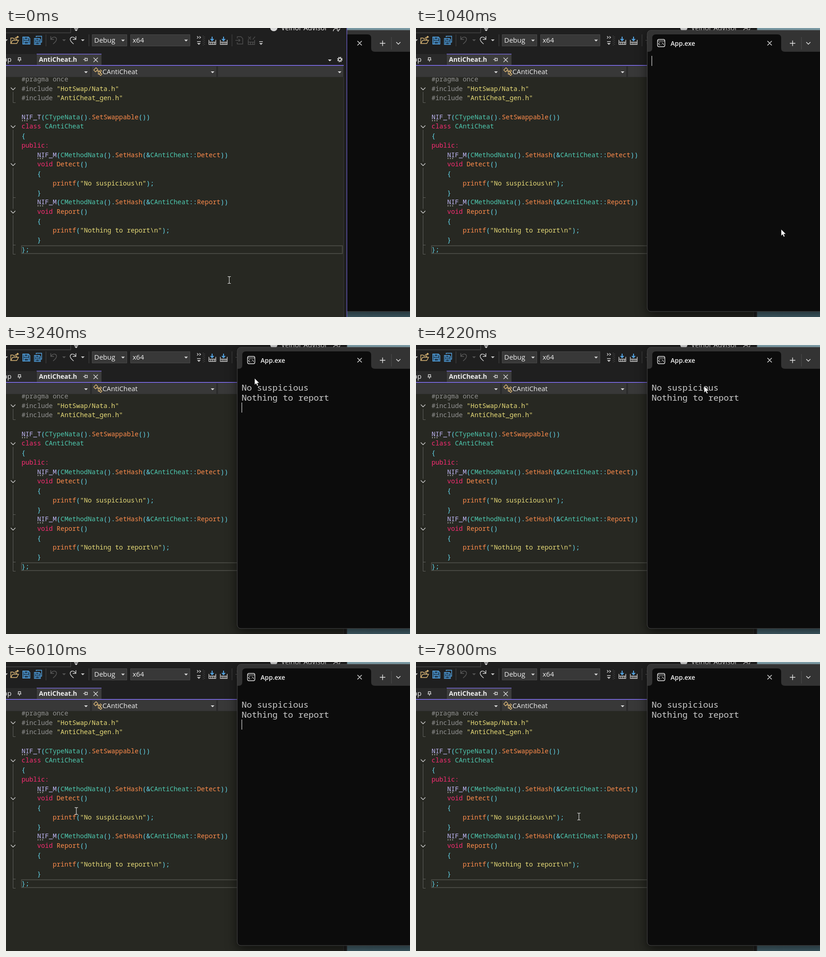
Animation of 884 by 633 pixels, one loop 8000 ms. Source, as an HTML page:

```html
<!DOCTYPE html>
<html lang="en">
<head>
<meta charset="utf-8">
<title>Hot reload demo</title>
<style>
  html, body { margin: 0; height: 100%; overflow: hidden; background: #1f1f1f; }
  svg { display: block; width: 100vw; height: 100vh; }
  text { font: 14.8px "Open Sans", sans-serif; fill: #f0f0f0; white-space: pre; }
  #code text { font: 500 14.23px "Noto Sans Mono", monospace; }
  #term { filter: drop-shadow(0 8px 12px #0009); }
  #term .out { font: 500 18.8px "Noto Sans Mono", monospace; fill: #ccc; }
  .line { fill: none; stroke-width: 1.4; }
</style>
</head>
<body>
<svg id="stage" viewBox="0 0 884 633">
  <defs>
    <linearGradient id="sky" x2="1" y2="0">
      <stop offset="0" stop-color="#7397a4"/><stop offset="1" stop-color="#8badb8"/>
    </linearGradient>
    <linearGradient id="sea" x2="1" y2="0">
      <stop offset="0" stop-color="#567683"/><stop offset="1" stop-color="#486873"/>
    </linearGradient>
    <path id="tri" d="M-4-2H4L0 2Z"/>
    <path id="fold" class="line" d="M-5-2.5L0 2.5L5-2.5" stroke="#d0d0d0"/>
    <g id="disk" class="line" stroke="#55a8e8">
      <path d="M.7.7H13L16.3 4V16.3H.7Z" fill="#24415a"/><path d="M4 1V6H12V1M4 16V10H13V16"/>
    </g>
    <g id="build" class="line">
      <path d="M8 0V8M4.5 5L8 8.5L11.5 5" stroke="#55a8e8" stroke-width="2"/>
      <path d="M1 7V17H16V7M1 12H16M5 12V17M9 12V17M13 12V17" stroke="#c8c8c8"/>
    </g>
    <g id="pin" class="line" stroke="#d8d8d8"><path d="M0 0H4M4-4V4M4-2.5H9V2.5H4"/></g>
  </defs>

  <rect width="884" height="20" fill="url(#sky)"/>
  <rect y="600" width="884" height="33" fill="url(#sea)"/>

  <g id="ide">
    <rect width="746" height="633" fill="#1f1f1f"/>
    <path class="line" d="M0 10.5H141.5V0" stroke="#444"/>
    <path d="M149 0h9v1.5h-9z" fill="#ddd"/><use href="#tri" x="153.500" y="5" fill="#ddd"/>
    <circle cx="586" cy="-1" r="8" fill="#d8d8d8"/>
    <text x="602" y="5" style="font-size:15px">Velnor Advisor</text>
    <path class="line" d="M716 7Q717 1 722 1Q725 1 727 3M724 4L727 7L731 1" stroke="#ddd"/>

    <!-- toolbar -->
    <g fill="#c8c8c8">
      <use href="#tri" x="0" y="27"/><use href="#tri" x="168" y="27"/>
      <use href="#tri" x="127" y="27" fill="#555"/>
      <use href="#tri" x="422" y="35"/><use href="#tri" x="558" y="35"/>
      <path d="M418 29h8v1.500h-8zM554 29h8v1.500h-8z"/>
    </g>
    <path class="line" d="M10.500 34V22H15.500L17.500 24H23.500V27M10.500 34L14.500 27H27.500L23.500 34ZM19.500 21H25.500V18M23 20.500L25.500 18L28 20.500" stroke="#e0bb78"/>
    <use href="#disk" x="36" y="19"/>
    <use href="#disk" x="61" y="21" transform="translate(9 4) scale(.86)"/>
    <path class="line" d="M66 20V18H78V31H76" stroke="#55a8e8"/>
    <path class="line" d="M87.500 14V40M181.500 14V40M494.500 14V40" stroke="#3d3d3d"/>
    <path class="line" d="M98 18V25H105M98 25Q102 19 107 20Q112 22 110 27Q109 30 103 35" stroke="#5a5a5a"/>
    <path class="line" d="M153 18V25H146M153 25Q149 19 144 20Q139 22 141 27Q142 30 148 35" stroke="#d0d0d0"/>
    <path d="M188.500 14.500h76v25h-76zM272.500 14.500h130v25h-130z" fill="#383838" stroke="#484848"/>
    <text x="193" y="32" style="font-size:15px">Debug</text>
    <text x="277" y="32" style="font-size:15px">x64</text>
    <use href="#tri" x="256" y="27.500" fill="#ddd"/><use href="#tri" x="394" y="27.500" fill="#ddd"/>
    <path class="line" d="M418 18L421 20.500L418 23M423 18L426 20.500L423 23" stroke="#ccc"/>
    <path class="line" d="M431.500 17V38M434.500 19V38" stroke="#555" stroke-dasharray="1.500 2.500"/>
    <use href="#build" x="443" y="19"/><use href="#build" x="468" y="19"/>
    <g class="line" stroke="#505050">
      <path d="M506 23V19H514L518 23V35H506V31M502 27H512M509 24L512 27L509 30"/>
      <path d="M530 26V36H544V26M530 31H544M535 31V36M540 31V36M530 19L536 25M536 19L530 25M540 25L545 19"/>
    </g>

    <!-- tabs -->
    <rect y="57" width="66" height="24" fill="#2a2a2a"/>
    <rect x="67" y="57" width="142" height="25" fill="#3d3d3d"/>
    <path d="M67 56.500h142v1.500H67zM0 81h739v2H0z" fill="#7567d2"/>
    <text x="12" y="74" text-anchor="end" fill="#ccc">pp</text>
    <use href="#pin" transform="translate(29.500 74) rotate(-90)"/>
    <text x="72" y="74" style="font-weight:700;font-size:14px">AntiCheat.h</text>
    <use href="#pin" x="169" y="69"/>
    <path class="line" d="M191.500 65L201 74.500M201 65L191.500 74.500" stroke="#ddd"/>
    <use href="#tri" x="708.500" y="71" fill="#ddd"/>
    <circle class="line" cx="730.500" cy="69" r="4.600" stroke="#ddd" style="stroke-width:2.500;stroke-dasharray:2.100 1.510"/>
    <circle class="line" cx="730.500" cy="69" r="3" stroke="#ddd"/>

    <!-- editor -->
    <rect y="107" width="739" height="526" fill="#272822"/>
    <rect x="34" y="477" width="702" height="17" fill="none" stroke="#464741" stroke-width="2"/>
    <path class="line" d="M15.500 140V163.500H21M15.500 223V293M15.500 306V396M15.500 371.500H21M15.500 410V495.500H21M15.500 475.500H21" stroke="#62635e" style="stroke-width:1"/>
    <g id="folds"></g>
    <g id="code"></g>
    <rect id="editCaret" x="50" y="477" width="1" height="17" fill="#eee"/>

    <!-- navigation bar -->
    <rect y="83" width="739" height="25" fill="#2b2b2b"/>
    <path d="M0 84h184v23H0zM188 84h272v23H188zM464 84h274v23H464z" fill="#383838"/>
    <text x="-3" y="101">:</text>
    <g fill="#ddd"><use href="#tri" x="175" y="97"/><use href="#tri" x="452" y="97"/><use href="#tri" x="730" y="97"/></g>
    <path class="line" d="M192 92L197 87L201 91L196 96ZM199 94H206M202 94V101H205M206 91L209 94L206 97L203 94M207 98L210 101L207 104L204 101Z" stroke="#e0bb78"/>
    <text x="211" y="101">CAntiCheat</text>
    <path d="M738 108h1v525h-1z" fill="#3a3a3a"/>
    <path id="ideEdge" d="M745 0h1.500v633h-1.500z"/>
  </g>

  <g id="term">
    <rect x="506" y="5" width="400" height="616" rx="8" fill="#0c0c0c"/>
    <path d="M506 52V13Q506 5 514 5H884V52Z" fill="#333"/>
    <path d="M509 52Q517 52 517 44V22Q517 14 525 14H791Q799 14 799 22V44Q799 52 807 52Z" fill="#0c0c0c"/>
    <rect x="506" y="5" width="400" height="616" rx="8" fill="none" stroke="#484848"/>
    <g class="line" stroke="#e8e8e8">
      <rect x="528.500" y="25" width="16" height="16" rx="3"/>
      <path d="M529 28.500H544M534.500 32Q531 32 531 34.500T534.500 37M537 32V33M537 36V37M539 32L542 37" style="stroke-width:1.200"/>
      <path d="M769 28.500L778.500 38M778.500 28.500L769 38M818 33.500H830M824 27.500V39.500M854 31L858.500 35.500L863 31"/>
      <path d="M843.500 20V47" stroke="#484848"/>
    </g>
    <text x="557" y="39" style="font-weight:600;font-size:14px">App.exe</text>
    <g id="output">
      <text class="out" x="515.500" y="100">No suspicious</text>
      <text class="out" x="515.500" y="121.500">Nothing to report</text>
    </g>
    <rect id="termCaret" x="515.400" width="1.200" height="22" fill="#ddd"/>
  </g>

  <g id="pointer">
    <path id="arrow" d="M0 0V14.200L3.300 11.200L5.700 16.500L8 15.500L5.700 10.300H10.300Z" fill="#fff" stroke="#111" stroke-width=".6"/>
    <path id="beam" class="line" d="M-3.500-7.500H-1L0-6.500L1-7.500H3.500M0-6.500V6.500M-3.500 7.500H-1L0 6.500L1 7.500H3.500" stroke="#e8e8e8" style="stroke-width:1.100"/>
  </g>
</svg>
<script>
const $ = id => document.getElementById(id);
const LOOP = 8000, SWITCH = 1040, PRINT = 1800;

const source = String.raw`#pragma once
#include "HotSwap/Nata.h"
#include "AntiCheat_gen.h"

NIF_T(CTypeNata().SetSwappable())
class CAntiCheat
{
public:
    NIF_M(CMethodNata().SetHash(&CAntiCheat::Detect))
    void Detect()
    {
        printf("No suspicious\n");
    }
    NIF_M(CMethodNata().SetHash(&CAntiCheat::Report))
    void Report()
    {
        printf("Nothing to report\n");
    }
};`;

// One colour per capture group: directive, string, macro, keyword, type, function, punctuation
const token = /(#\w+(?: once)?)|("[^"]*")|(NIF_\w)|(class|void|public:)|(C[A-Z]\w+)|(\w+)|([^\w\s"]+)|\s+/g;
const colours = ['#929292', '#e8dc78', '#bdb5f2', '#f92c72', '#4ec9b0', '#ff8c4c', '#63d8ec'];

const rowY = row => 116.8 + 20.73 * row;
$('code').innerHTML = source.split('\n').map((line, row) => {
  const spans = line.replace(token, (word, ...groups) => {
    const colour = colours[groups.slice(0, 7).findIndex(Boolean)] || '#fff';
    return `<tspan style="fill:${colour}">${word.replace(/&/g, '&amp;')}</tspan>`;
  });
  const macroX = 35 + line.search('NIF') * 8.54;
  const dots = line.includes('NIF')
    ? `<path d="M${macroX} ${rowY(row) + 3.2}h14" stroke="#b0b0b0" stroke-width="2" stroke-dasharray="2 3"/>` : '';
  return `<text x="34" y="${rowY(row)}">${spans}</text>${dots}`;
}).join('');
$('folds').innerHTML = [133, 216, 299, 403].map(y => `<use href="#fold" x="15.5" y="${y}"/>`).join('');

// Pointer path: time, x, y
const path = [
  [100, 488.5, 552], [450, 650, 505], [800, 799, 441], [1770, 799, 441], [2020, 795, 427],
  [2360, 795, 427], [3160, 544, 73], [3240, 544, 73], [3940, 656, 90], [4070, 656, 90],
  [4480, 573, 90], [4650, 573, 90], [4820, 606, 93], [5070, 606, 93], [5330, 416, 143],
  [5800, 141, 314], [5890, 141, 314], [6250, 190, 361], [6690, 164.5, 330], [6720, 164.5, 330],
  [7060, 270, 356], [7500, 353.5, 339], [7540, 353.5, 339], [7630, 356.5, 338.5]
];
const slope = (i, axis) => path[i] && path[i + 1]
  ? (path[i + 1][axis] - path[i][axis]) / (path[i + 1][0] - path[i][0]) : 0;
// Harmonic mean keeps the curve from overshooting its points
const tangent = (i, axis) => {
  const a = slope(i - 1, axis), b = slope(i, axis);
  return a * b > 0 ? 2 * a * b / (a + b) : 0;
};
function pointerAt(time, axis) {
  const next = path.findIndex(point => point[0] > time);
  if (next === 0) return path[0][axis];
  if (next < 0) return path[path.length - 1][axis];
  const i = next - 1, span = path[next][0] - path[i][0], u = (time - path[i][0]) / span;
  const blend = u * u * (3 - 2 * u);
  return path[i][axis] * (1 - blend) + path[next][axis] * blend
    + span * u * (1 - u) * ((1 - u) * tangent(i, axis) - u * tangent(next, axis));
}

const blinks = [SWITCH, 1590, PRINT, 2420, 3060, 3720, 4650, 5240, 5900, 6540, 7170, 7800];
const show = (id, visible) => $(id).setAttribute('visibility', visible ? 'visible' : 'hidden');
let termInFront;

function draw(time) {
  const inFront = time >= SWITCH;
  if (inFront !== termInFront) {
    $('stage').insertBefore($('term'), inFront ? $('pointer') : $('ide'));
    $('ideEdge').setAttribute('fill', inFront ? '#333' : '#6259b4');
    termInFront = inFront;
  }
  show('editCaret', time >= 390 && time < 920);
  show('output', time >= PRINT);
  show('termCaret', blinks.filter(t => t <= time).length % 2);
  $('termCaret').setAttribute('y', time < PRINT ? 61 : 126);

  const x = pointerAt(time, 1), y = pointerAt(time, 2);
  const overEditor = x < (inFront ? 506 : 739) && y > 108;
  show('beam', overEditor);
  show('arrow', !overEditor);
  $('pointer').setAttribute('transform', `translate(${x.toFixed(1)} ${y.toFixed(1)})`);
}

const start = performance.now();
function tick() {
  draw((performance.now() - start) % LOOP);
  requestAnimationFrame(tick);
}
tick();
</script>
</body>
</html>
```
